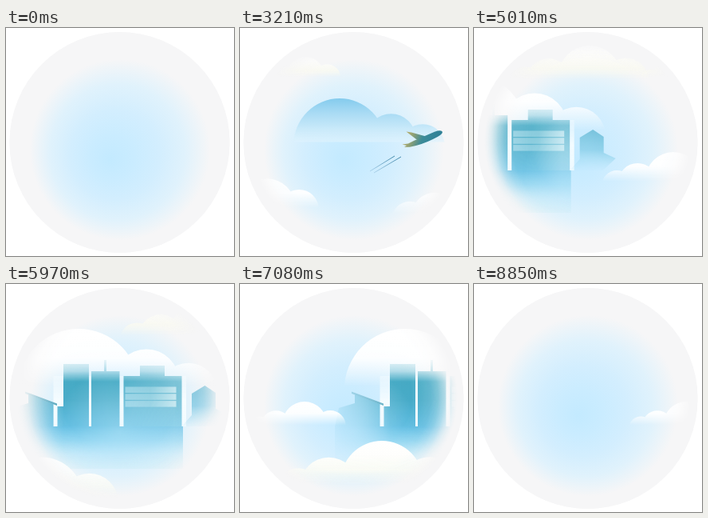
Recreate the animation shown at these times as an HTML page with a canvas. Size 286 by 285 pixels, loop 9660 ms.

```html
<!DOCTYPE html>
<html lang="en">
<head>
<meta charset="utf-8">
<title>Flight over the city</title>
<style>
html, body { margin: 0; width: 100%; height: 100%; overflow: hidden; background: #fff; }
canvas { display: block; width: 286px; height: 285px; }
</style>
</head>
<body>
<canvas id="stage" width="286" height="285"></canvas>
<script>
const W = 286, H = 285, LOOP = 9660, START = 420, END = 8850, STEP = 30;
const SPEED = .1045;
const ctx = document.getElementById('stage').getContext('2d');
const layer = document.createElement('canvas');
layer.width = W;
layer.height = H;
const g = layer.getContext('2d');

const clamp = v => Math.max(0, Math.min(1, v));

// Colours are spread evenly over the gradient.
function spread(grad, ...colors) {
  colors.forEach((c, i) => grad.addColorStop(i / (colors.length - 1), c));
  return grad;
}
const vertical = (y0, y1, ...colors) => spread(g.createLinearGradient(0, y0, 0, y1), ...colors);
const across = (x0, x1, ...colors) => spread(g.createLinearGradient(x0, 0, x1, 0), ...colors);
const alpha = a => `rgba(0,0,0,${a})`;

function poly(points, fill) {
  g.beginPath();
  points.forEach(([x, y]) => g.lineTo(x, y));
  g.closePath();
  g.fillStyle = fill;
  g.fill();
}
function box(x, y, x2, y2, fill) {
  g.fillStyle = fill;
  g.fillRect(x, y, x2 - x, y2 - y);
}
function blend(mode, fill) {
  g.globalCompositeOperation = mode;
  box(-W * 3, 0, W * 3, H, fill);
  g.globalCompositeOperation = 'source-over';
}
function rim(inner, outer) {
  blend('destination-in', spread(g.createRadialGradient(143, 141, inner, 143, 141, outer),
    alpha(1), alpha(.75), alpha(0)));
}

// Puffs as [dx, dy, radius] in units of the cloud's size.
const HEAP = { depth: 1.05, puffs: [[0, 0, 1], [-1.28, .4, .7], [1.15, .39, .7], [-2.02, .66, .55]] };
const HILL = { depth: .88, puffs: [[0, 0, .93], [1.04, .31, .5], [1.68, .52, .45]] };
const WHITE = ['#fff', 'rgba(255,255,255,.92)', 'rgba(255,255,255,0)'];
const CREAM = ['#fff', '#fefefc', 'rgba(252,252,244,.9)', 'rgba(251,250,240,0)'];
const HAZE = ['rgba(255,255,255,.6)', 'rgba(253,253,249,.8)', 'rgba(250,250,240,.8)', 'rgba(250,250,240,0)'];
const BLUE = ['#84cbed', '#a9dbf4', '#c6e8f9', 'rgba(222,242,253,.7)'];

function cloud(t, at, x, y, size, colors, { shape = HEAP, vx = SPEED, vy = 0 } = {}) {
  const base = y + size * shape.depth;
  g.save();
  g.translate((t - at) * vx, (t - at) * vy);
  g.beginPath();
  g.rect(-W * 3, y - 5, W * 6, base - y + 5);
  g.clip();
  g.beginPath();
  for (const [dx, dy, r] of shape.puffs) {
    const cx = x + dx * size, cy = y + (dy + r) * size;
    g.moveTo(cx + r * size, cy);
    g.arc(cx, cy, r * size, 0, Math.PI * 2);
  }
  g.fillStyle = vertical(y, base, ...colors);
  g.fill();
  g.restore();
}

function city(t) {
  const wall = vertical(112, 178, '#3ea6c0', '#41a8c6', '#4eb5dc');
  const floor = 178;
  g.save();
  g.translate((t - 5970) * SPEED, 0);

  // slanted-roof block with its low annex
  poly([[28, 138], [59.5, 150], [59.5, floor], [3, floor], [8, 155], [28, 149]], wall);
  poly([[24, 134.5], [64, 149.5], [64, 152], [24, 137]], '#3796b0');
  box(64.5, 153, 73, floor, wall);

  // towers
  box(72, 100, 104, floor, wall);
  box(107, 109, 142.5, floor, wall);
  box(123, 95, 126, 109, wall);

  // wide block with window bands
  box(147.5, 115, 220.5, floor, wall);
  box(168, 102, 199, 115, wall);
  const band = across(149, 214, 'rgba(195,232,243,.55)', 'rgba(165,218,230,.5)', 'rgba(225,244,247,.7)');
  for (let y = 128.5; y < 150; y += 8.8) box(149.5, y, 213.5, y + 7.5, band);

  // gabled house
  poly([[233, 137], [249.5, 127], [263, 136], [263, 156], [278, 163], [262, floor],
    [220.5, floor], [233, 164]], vertical(127, floor, '#45a9c8', '#5fbbdc', 'rgba(140,211,238,.1)'));

  box(3, floor, 222, 231, vertical(floor, 231, '#50b6de', 'rgba(100,196,232,.75)',
    'rgba(140,215,240,.4)', 'rgba(185,232,240,.3)'));

  blend('destination-in', across(3, 280, alpha(.12), alpha(.95), alpha(1), alpha(.65), alpha(.8)));
  g.restore();

  blend('destination-in', vertical(96, 122, alpha(.1), alpha(.35), alpha(1)));
  blend('source-atop', spread(g.createRadialGradient(142, 185, 0, 142, 185, 80),
    'rgba(205,238,252,.5)', 'rgba(205,238,252,.28)', 'rgba(205,238,252,0)'));
  rim(72, 138);

  // pale light seen between the walls
  g.save();
  g.globalCompositeOperation = 'destination-over';
  g.translate((t - 5970) * SPEED, 0);
  box(59.5, 115, 226, floor, vertical(115, floor, 'rgba(250,254,255,.3)', 'rgba(248,253,255,.9)', 'rgba(245,252,255,.85)'));
  g.restore();
}

function trail(x0, y0, x1, y1) {
  g.strokeStyle = spread(g.createLinearGradient(x0, y0, x1, y1), 'rgba(80,140,180,.25)', '#3e86a8');
  g.beginPath();
  g.moveTo(x0, y0);
  g.lineTo(x1, y1);
  g.stroke();
}

function plane(t) {
  g.save();
  g.translate((t - 3210) * .139, (t - 3210) * -.017);
  trail(163, 179, 194, 160);
  trail(168, 181, 202, 161);
  const paint = spread(g.createLinearGradient(207, 130, 250, 146),
    '#c2b46d', '#8c9f75', '#3e8c98', '#34859a', '#2c7e94');
  poly([[208.5, 129.5], [215, 130.5], [235, 136], [227, 141], [221, 139]], paint);
  g.beginPath();
  g.moveTo(203.5, 145.5);
  g.lineTo(211, 144.5);
  g.lineTo(219, 140.5);
  g.lineTo(244, 129.8);
  g.quadraticCurveTo(253, 126.8, 254, 130);
  g.quadraticCurveTo(254, 133.5, 242, 139);
  g.quadraticCurveTo(228, 146, 213, 148.8);
  g.lineTo(206, 149);
  g.lineTo(209, 147);
  g.closePath();
  g.fill();
  g.restore();
}

function sky() {
  ctx.fillStyle = '#fff';
  ctx.fillRect(0, 0, W, H);
  ctx.beginPath();
  ctx.arc(142.5, 143, 138, 0, Math.PI * 2);
  ctx.fillStyle = '#f6f6f7';
  ctx.fill();
  ctx.fillStyle = spread(ctx.createRadialGradient(130, 165, 0, 143, 152, 113),
    '#c3eaff', '#caecff', '#d3eefe', '#e0f2fc', '#f6f6f7');
  ctx.fill();
}

function paintLayer(draw) {
  g.clearRect(0, 0, W, H);
  draw();
  ctx.drawImage(layer, 0, 0);
}

function scene(t) {
  const rising = { vx: .12, vy: -.0185 };
  paintLayer(() => {
    city(t);
    g.globalCompositeOperation = 'destination-over';
    cloud(t, 5970, 91, 56, 82, WHITE, { shape: HILL });
    g.globalAlpha = clamp((4700 - t) / 900);
    cloud(t, 3210, 125, 88, 62, BLUE, { shape: HILL, vx: .1 });
    g.globalAlpha = 1;
    cloud(t, 5010, 145, 22, 40, HAZE);
    cloud(t, 5010, 270, 36, 24, HAZE);
    g.globalCompositeOperation = 'source-over';
    cloud(t, 1860, 157, 189, 42, WHITE);
    cloud(t, 5010, 250, 155, 35, WHITE, rising);
    cloud(t, 7080, 81, 147, 28, WHITE);
    cloud(t, 7080, 178, 196, 52, CREAM, rising);
    rim(96, 130);
  });
  paintLayer(() => {
    plane(t);
    rim(116, 134);
  });
}

const begin = performance.now();
function frame() {
  const t = (performance.now() - begin) % LOOP;
  sky();
  if (t >= START) scene(Math.min(END, Math.floor(t / STEP) * STEP));
  requestAnimationFrame(frame);
}
frame();
</script>
</body>
</html>
```
